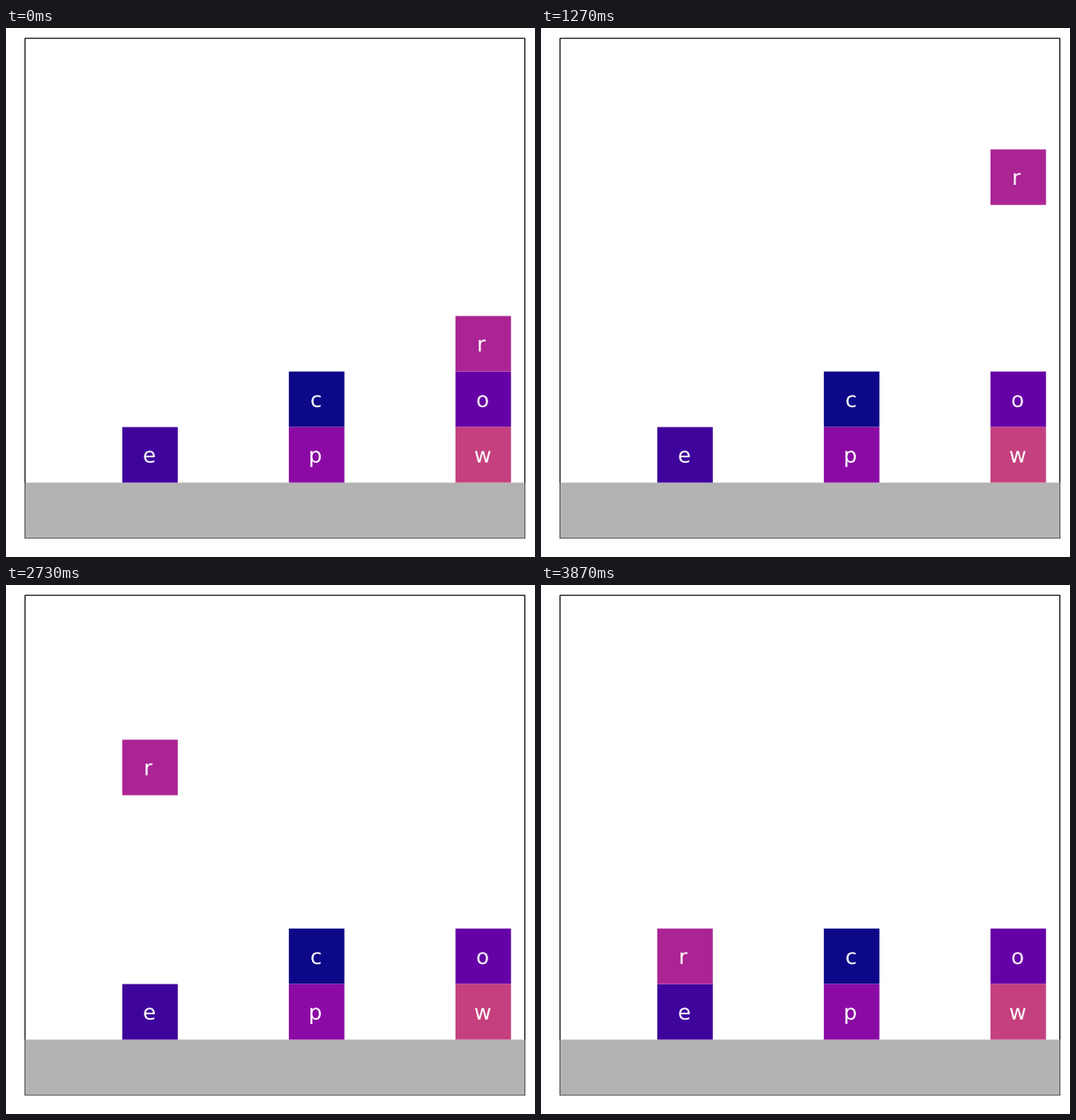
These frames come from a looping animation (600 px wide and 600 px high, 4.87 s). A matplotlib script:

```python
import numpy as np
import matplotlib.pyplot as plt
from matplotlib.animation import FuncAnimation
from matplotlib.patches import PathPatch, Rectangle
from matplotlib.textpath import TextPath
from matplotlib.transforms import Affine2D

SIZE, LOOP_MS, FRAMES, FPS = 600, 4870, 244, 15
INTERVAL = LOOP_MS / FRAMES
LAST_STEP = 58
LEFT, BOTTOM, UNIT = 21.6, 21.4, 62.99
FONT_PX = 24
CAP_HEIGHT = 0.729 * FONT_PX

fig = plt.figure(figsize=(6, 6), dpi=100, facecolor="white")
ax = fig.add_axes([0, 0, 1, 1])
ax.set(xlim=(0, SIZE), ylim=(0, SIZE))
ax.axis("off")


def add_rect(x, y, w, h, **style):
    return ax.add_patch(Rectangle((x, y), w, h, snap=False, **style))


class Block:
    """A lettered square; position is in block widths above the ground."""

    def __init__(self, letter, color, x, y):
        self.rect = add_rect(0, 0, UNIT, UNIT, fc=color, lw=0)
        glyph = TextPath((0, 0), letter, size=FONT_PX, prop={"family": "DejaVu Sans"})
        box = glyph.get_extents()
        self.offset = (UNIT / 2 - box.x1 / 2 - box.x0, (UNIT - CAP_HEIGHT) / 2)
        self.label = ax.add_patch(PathPatch(glyph, fc="white", lw=0, snap=False))
        self.move(x, y)

    def move(self, x, y):
        px, py = LEFT + x * UNIT, BOTTOM + (y + 1) * UNIT
        self.rect.set_xy((px, py))
        shift = Affine2D().translate(px + self.offset[0], py + self.offset[1])
        self.label.set_transform(shift + ax.transData)


add_rect(LEFT, BOTTOM, 9 * UNIT, 9 * UNIT, fill=False, ec="black", lw=0.8)
add_rect(LEFT, BOTTOM, 9 * UNIT, UNIT, fc="#b3b3b3", lw=0)

columns = {"e": (1.75, 0), "p": (4.75, 0), "c": (4.75, 1),
           "w": (7.75, 0), "o": (7.75, 1), "r": (7.75, 2)}
blocks = {}
for i, letter in enumerate("ceoprw"):
    blocks[letter] = Block(letter, plt.cm.plasma(i * 2 / 21), *columns[letter])


def pose(step):
    lift = min(step + 1, 20) if step > 0 else 0
    slide = min(step - 28, 10) if step >= 30 else 0
    drop = np.clip(step - 38, 0, 20)
    return 7.75 - 0.6 * slide, 2 + 0.15 * lift - 0.2 * drop


def update(frame):
    step = min(LAST_STEP, int((frame + 1) * INTERVAL * FPS / 1000))
    blocks["r"].move(*pose(step))
    return blocks["r"].rect, blocks["r"].label


anim = FuncAnimation(fig, update, frames=FRAMES, interval=INTERVAL,
                     repeat=True, repeat_delay=0, blit=False)
plt.show()
```
